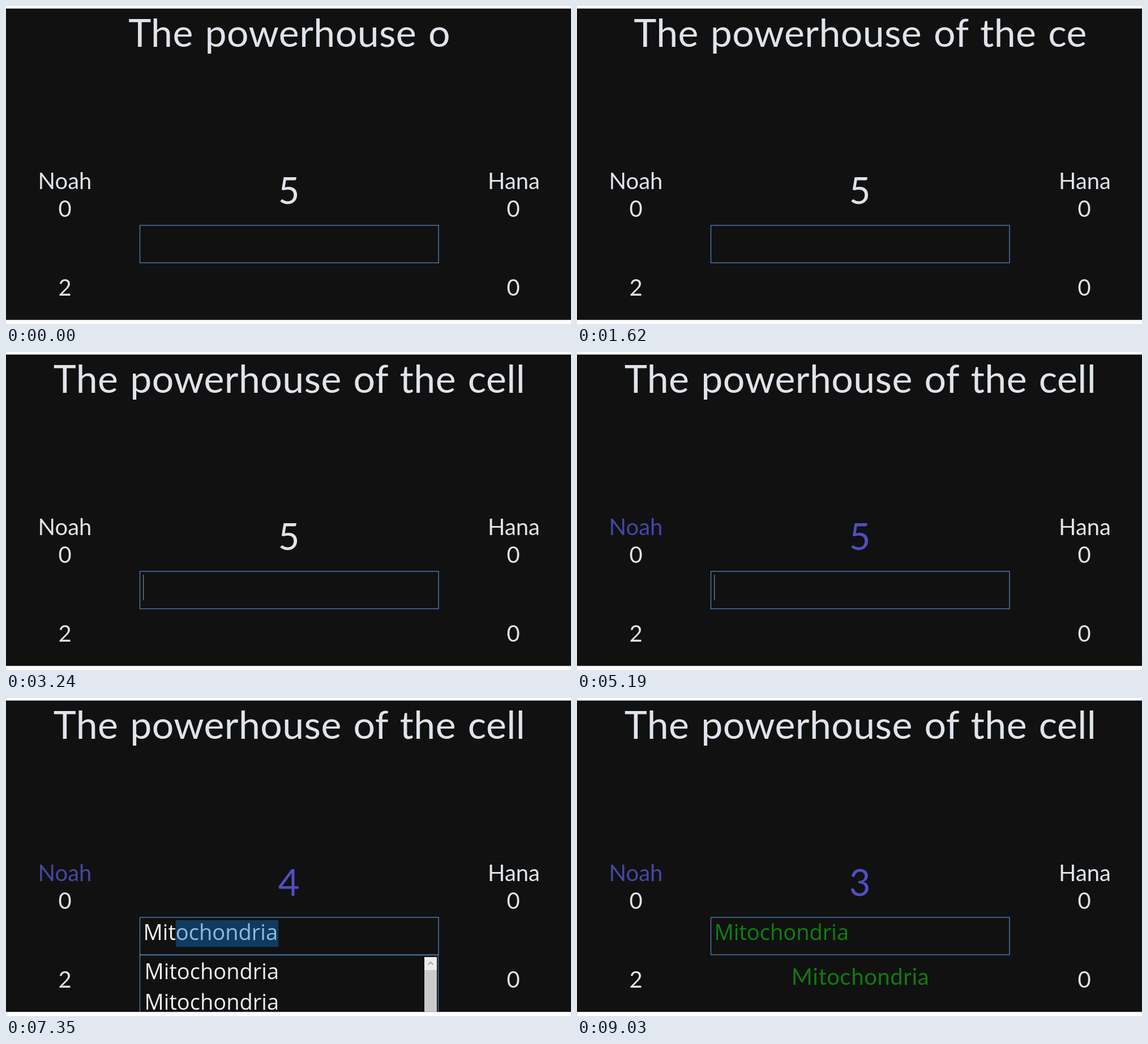
Animation of 998 by 561 pixels, one loop 9.09 s. Source, as an HTML page:

```html
<!DOCTYPE html>
<html lang="en">
<head>
<meta charset="utf-8">
<title>Quiz buzzer</title>
<style>
  html, body { margin: 0; width: 100%; height: 100%; overflow: hidden; background: #fff; }
  svg { display: block; width: 100%; height: 100%; }
  text { fill: #dfe4ea; font: 400 40px Lato, Quicksand, sans-serif; text-anchor: middle; }
  #title { font-size: 68px; letter-spacing: .4px; word-spacing: 3px; }
  #timer { font-size: 65px; }
  #result { fill: #107a10; letter-spacing: .6px; }
  .entry text { fill: #f0f0f0; font: 400 38px "Open Sans", "Noto Sans", sans-serif; text-anchor: start; }
  .edge { fill: none; stroke: #4a76a8; stroke-width: 1.5; }
</style>
</head>
<body>
<svg viewBox="0 0 998 561">
  <defs>
    <clipPath id="stage"><rect y="4.5" width="998" height="549.2"/></clipPath>
  </defs>
  <g clip-path="url(#stage)">
    <rect y="4" width="998" height="550" fill="#111"/>
    <text id="title" x="500.5" y="72"></text>

    <text id="player" x="104" y="323">Noah</text>
    <text x="104" y="372">0</text>
    <text x="104" y="511">2</text>

    <text x="897" y="323">Hana</text>
    <text x="896" y="372">0</text>
    <text x="896" y="511">0</text>

    <text id="timer" x="499.5" y="349"></text>

    <g class="entry">
      <rect class="edge" x="236.5" y="387" width="527.5" height="66"/>
      <rect id="caret" x="242" y="393" width="1.4" height="45" fill="#777"/>
      <rect id="selection" y="392" height="47" fill="#0f3b61"/>
      <text id="answer" x="242.5" y="427"><tspan id="typed"></tspan><tspan id="rest" fill="#8fbbe0"></tspan></text>
    </g>

    <g id="menu" class="entry">
      <rect class="edge" x="236.5" y="453.5" width="527" height="120"/>
      <text x="244.5" y="496">Mitochondria</text>
      <text x="244.5" y="549.5">Mitochondria</text>
      <rect x="739" y="457" width="22" height="97" fill="#cbcbcb"/>
      <rect x="739" y="457" width="22" height="23" fill="#ededed"/>
      <path d="M745.5 470.5l4.5-4.5 4.5 4.5" fill="none" stroke="#8a8a8a" stroke-width="1.4"/>
    </g>

    <text id="result" x="500.5" y="506">Mitochondria</text>
  </g>
</svg>
<script>
const LOOP = 9090;
const QUESTION = "The powerhouse of the cell";
const ANSWER = "Mitochondria";
const BLUE = "#4646a4", TIMER_BLUE = "#524dc4", GREEN = "#108010";

const BUZZ = 3570, CLOSE_MENU = 7740, SUBMIT = 8160;
// [start time, value]
const COUNTDOWN = [[0, 5], [5520, 4], [7440, 3]];
const TYPED = [[0, 0], [5430, 1], [6300, 2], [6840, 3], [CLOSE_MENU, ANSWER.length]];

const $ = id => document.getElementById(id);
const [title, player, timer, caret, selection, answer, typed, rest, menu, result] =
  ["title", "player", "timer", "caret", "selection", "answer", "typed", "rest", "menu", "result"].map($);

const valueAt = (steps, t) => steps.filter(([start]) => start <= t).pop()[1];
const show = (el, on) => el.setAttribute("visibility", on ? "visible" : "hidden");
const setText = (el, s) => { if (el.textContent !== String(s)) el.textContent = s; };

function draw(t) {
  setText(title, QUESTION.slice(0, Math.floor(16.4 + t / 200)).trim());

  const buzzed = t >= BUZZ;
  player.style.fill = buzzed ? BLUE : "";
  timer.style.fill = buzzed ? TIMER_BLUE : "";
  setText(timer, valueAt(COUNTDOWN, t));

  const count = valueAt(TYPED, t);
  const completing = count > 0 && count < ANSWER.length;
  setText(typed, ANSWER.slice(0, count));
  setText(rest, completing ? ANSWER.slice(count) : "");
  typed.style.fill = t >= SUBMIT ? GREEN : "";

  const blinkOn = (t + 1530) % 2040 < 1020;
  show(caret, count === 0 && blinkOn);
  show(menu, completing);
  show(selection, completing);
  if (completing) {
    const left = +answer.getAttribute("x");
    const start = answer.getSubStringLength(0, count);
    selection.setAttribute("x", left + start);
    selection.setAttribute("width", answer.getComputedTextLength() - start + 1);
  }
  show(result, t >= SUBMIT);
}

const began = performance.now();
function tick() {
  draw((performance.now() - began) % LOOP);
  requestAnimationFrame(tick);
}
tick();
</script>
</body>
</html>
```
